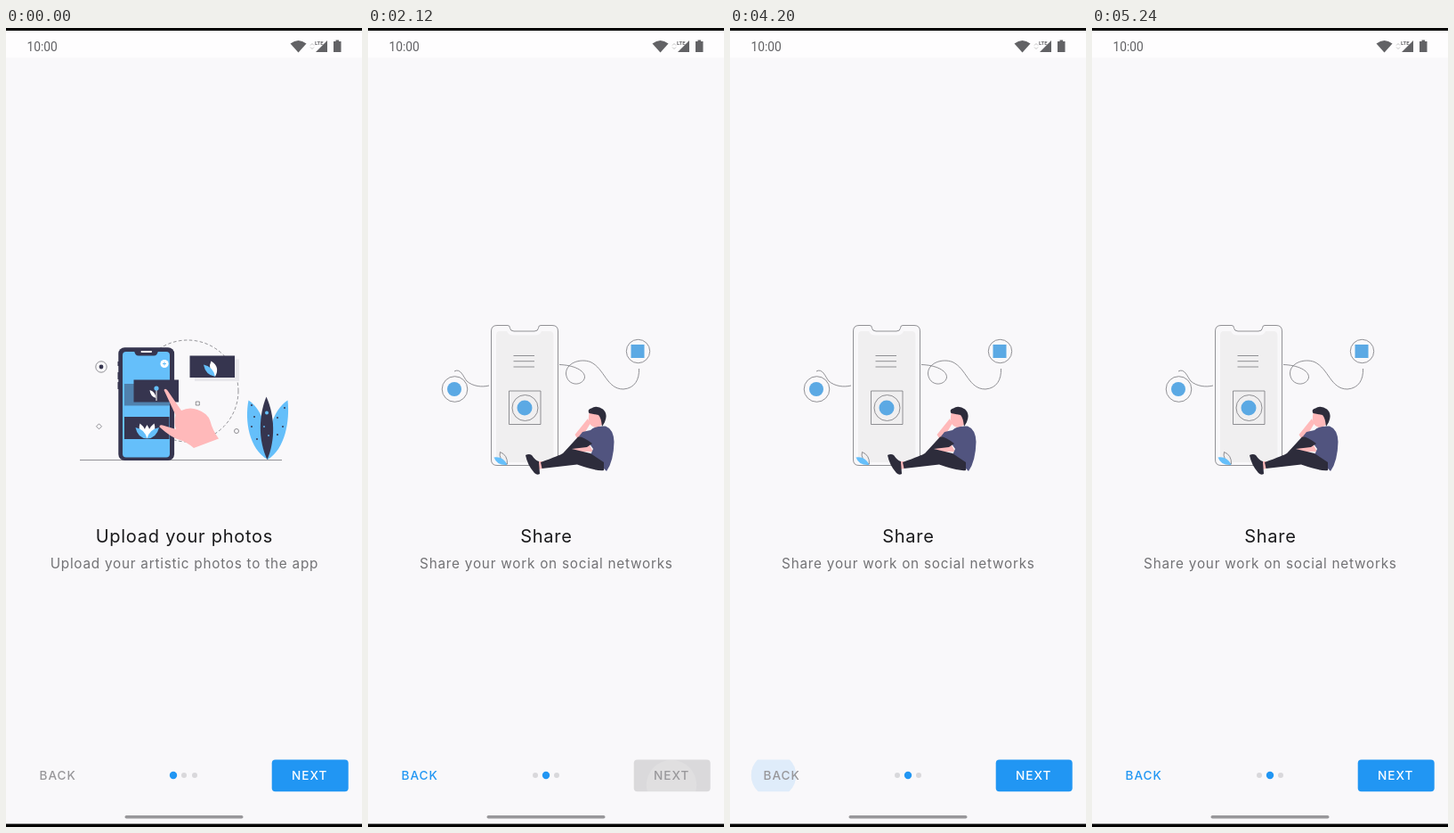
Write an HTML page that moves like this. It is 400x896 px and loops after 5280 ms.

```html
<!DOCTYPE html>
<html lang="en">
<head>
<meta charset="utf-8">
<title>Onboarding</title>
<style>
  html, body { margin: 0; width: 100%; height: 100%; overflow: hidden; background: #f9f8fa; }
  svg { display: block; width: 100vw; height: 100vh; }
  text { font-family: Inter, sans-serif; }
  .title { font-size: 20px; letter-spacing: .75px; fill: #1a1a1c; text-anchor: middle; }
  .sub { font-size: 15.3px; letter-spacing: .76px; fill: #727275; text-anchor: middle; }
  .label { font-size: 13.6px; font-weight: 500; letter-spacing: 1px; }
  .ink { fill: #36354f; }
  .blue { fill: #65bffa; }
  .white { fill: #fff; }
  .skin { fill: #ffb9ba; }
  .mark { fill: #5ba9e4; }
  .line { fill: none; stroke: #77777b; stroke-width: .8; }
</style>
</head>
<body>
<svg viewBox="0 0 400 896">
  <defs>
    <clipPath id="backClip"><rect x="16" y="820.500" width="85" height="35.800" rx="4"/></clipPath>
    <clipPath id="nextClip"><rect x="298.700" y="820.500" width="86" height="35.800" rx="4"/></clipPath>
  </defs>
  <rect width="400" height="896" fill="#f9f8fa"/>
  <rect y="3" width="400" height="30.500" fill="#fefdfe"/>
  <path d="M0 0H400V3H0zM0 892.500H400V896H0z"/>

  <g fill="#626265">
    <text x="23.500" y="25.500" style="font:13.800px Roboto,sans-serif">10:00</text>
    <path d="M319.500 17.500Q328.500 10.500 337.500 17.500L328.500 27.500z"/>
    <path d="M361 14V27H348z"/>
    <text x="347" y="18.500" style="font:bold 5.800px Roboto,sans-serif">LTE</text>
    <path d="M342 19.500l2-2 2 2M342 21.500l2 2 2-2" fill="none" stroke="#aaa" stroke-width=".7"/>
    <path d="M370.500 13.500h3.500v1.500h2.500v12h-8.500v-12h2.500z"/>
  </g>
  <rect x="133.500" y="883" width="133" height="3.600" rx="1.800" fill="#98979a"/>

  <g class="page">
    <circle class="line" cx="204" cy="407" r="57" stroke-dasharray="3.500 2.500"/>
    <path class="line" d="M83 484.500H310"/>
    <rect class="ink" x="126.300" y="358.300" width="62.800" height="126.700" rx="7"/>
    <path class="ink" d="M125.500 374h2v5h-2zM125.500 386h2v8h-2zM125.500 397h2v8h-2z"/>
    <rect class="blue" x="131" y="363" width="53" height="118.500" rx="4"/>
    <path class="ink" d="M144 362H171Q170 367.500 166 367.500H149Q145 367.500 144 362z"/>
    <rect class="white" x="151.500" y="362" width="12.500" height="2" rx="1"/>
    <circle class="white" cx="178" cy="376.500" r="4.600"/>
    <path d="M176 376.500h4M178 374.500v4" stroke="#65bffa"/>
    <rect x="133" y="399" width="51" height="24.500" fill="#36354f" opacity=".45"/>
    <rect class="ink" x="143.500" y="394.500" width="50.500" height="25"/>
    <path d="M169 405V418" stroke="#fff"/>
    <path class="white" d="M168.500 415Q162 413 161.500 406Q168 408 168.500 415z"/>
    <circle class="blue" cx="169" cy="404" r="2.600"/>
    <rect class="ink" x="133" y="436" width="50.500" height="25"/>
    <path class="white" d="M158.500 460Q147 454 150.500 443.500Q158 449 158.500 460Q159 449 166.500 443.500Q170 454 158.500 460z"/>
    <path class="white" d="M158.500 460Q153 452 158.500 445Q164 452 158.500 460z"/>
    <path class="blue" d="M158.500 460.500Q148 460 145.500 448Q156 450 158.500 460.500Q161 450 172 448Q169 460 158.500 460.500z"/>
    <rect x="212" y="371.500" width="50" height="24.500" fill="#e9e8ec"/>
    <rect class="ink" x="206.500" y="367.500" width="50.500" height="24.500"/>
    <path class="white" d="M235 391Q226 382 230.500 373.500Q241 380 235 391z"/>
    <path class="blue" d="M235 391Q224 389 222 377.500Q233 380 235 391z"/>
    <path class="skin" d="M177.500 406Q179 403.500 181.500 406.500L197 429Q206 424.500 215 428Q227 432 229.500 441Q232 451 239 460.500L211 471Q203 464 194 461.500Q186 459.500 172.500 447.500Q172 444.500 176 445.500L191 450Q188 442 190.500 434Q184 420 177.500 406z"/>
    <circle class="line" cx="107" cy="380" r="6.200"/>
    <circle class="ink" cx="107" cy="380" r="2.400"/>
    <path class="line" d="M104.500 443.800l3 3-3 3-3-3zM213.300 419h4v4h-4z"/>
    <circle class="line" cx="259" cy="452" r="2.500"/>
    <path class="blue" d="M294 484C273 472 268 440 272.500 417.500C290 429 295 455 294 484C293 455 299 429 316.500 417.500C319 440 314 472 294 484z"/>
    <path class="ink" d="M293.500 484C283 462 284 434 292.500 413.500C302 434 303 462 293.500 484z"/>
    <g class="ink">
      <circle cx="276" cy="423" r="1"/><circle cx="279" cy="436" r="1"/><circle cx="276" cy="447" r="1"/>
      <circle cx="282" cy="461" r="1"/><circle cx="313" cy="426" r="1"/><circle cx="305" cy="437" r="1"/>
      <circle cx="311" cy="447" r="1"/><circle cx="305" cy="456" r="1"/>
    </g>
    <g class="blue">
      <circle cx="293" cy="431.500" r="2"/><circle cx="290" cy="447" r=".9"/><circle cx="295" cy="457" r=".9"/>
    </g>
    <text class="title" x="200.400" y="577">Upload your photos</text>
    <text class="sub" x="200.400" y="605.500">Upload your artistic photos to the app</text>
  </g>

  <g class="page">
    <path class="line" d="M145 333.500H157Q159.500 333.500 159.500 336.500Q160 340 164 340H187Q191 340 191.500 336.500Q191.500 333.500 194 333.500H207Q213.500 333.500 213.500 340V484Q213.500 490.500 207 490.500H145Q138.500 490.500 138.500 484V340Q138.500 333.500 145 333.500z"/>
    <path fill="#f0eff0" d="M148 340H156Q158 344.500 163 344.500H188Q193 344.500 195 340H204Q208.500 340 208.500 345V482Q208.500 487 204 487H148Q144 487 144 482V345Q144 340 148 340z"/>
    <path class="line" d="M163.500 367.500h23.500m-23.500 6.200h23.500m-23.500 6.300h23.500M158.500 407h35.500v37.500h-35.500z"/>
    <circle class="line" cx="176.500" cy="426" r="14.500"/>
    <circle class="mark" cx="176" cy="426" r="8.500"/>
    <circle class="line" cx="97.500" cy="405" r="14.300"/>
    <circle class="mark" cx="97" cy="405" r="8"/>
    <circle class="line" cx="303.500" cy="362.500" r="13.200"/>
    <rect class="mark" x="295.500" y="355" width="15" height="15"/>
    <path class="line" d="M97 385C104 381 107 391 111 396C118 402 128 403 136 401M215 377.500C231 378 244 384 243.500 392C241 402 224 402 222.500 388C222 376 238 370 250 374.500C266 382 268 405 287 405C300 404 305 394 304.500 382"/>
    <path class="line" d="M156.500 489Q146 483 148.500 475.500Q157 479 156.500 489z"/>
    <path class="blue" d="M156.500 490Q145 491 141.500 481.500Q152 480 156.500 490z"/>
    <path class="skin" d="M249 430Q246 441 251 446L257 449 264 444V431zM247 438L232.500 456 235 460 241 458 249.500 444zM229 471L249 468 253 475 233 475zM190 486L196 486 196 494 191 495z"/>
    <path fill="#51547f" d="M250 451Q254 446 267 446.500Q276 450 276.500 464Q276 486 268 497L260 489Q250 487 249 481L253 472 248 465 237 458 241 453z"/>
    <path fill="#2d2c3b" d="M236 458.500Q240 457 252 466L246 470 229 472 250 477 265 487V496Q258 497.500 235 489.500L195.500 494 194 487Q216 479 219 477zM177 479Q181 477 184 479Q188 485 192 486L193 500Q190 502 187 499Q179 490 177 479z"/>
    <path fill="#2d2c3b" d="M248.500 432Q246 428 251 426.500Q257 422.500 264 427.500Q270 433 266 442L263 447Q262 437 259 434Q254 433 248.500 432z"/>
    <text class="title" x="200.400" y="577">Share</text>
    <text class="sub" x="200.400" y="605.500">Share your work on social networks</text>
  </g>

  <g class="page"></g>

  <g clip-path="url(#backClip)"><circle id="backRipple" fill="#2196f3"/></g>
  <text id="back" class="label" x="37.500" y="843">BACK</text>
  <rect id="nextBox" x="298.700" y="820.500" width="86" height="35.800" rx="4"/>
  <g clip-path="url(#nextClip)"><circle id="nextRipple" fill="#fff"/></g>
  <text id="next" class="label" x="321" y="843">NEXT</text>
  <circle class="dot" cx="188" cy="838"/>
  <circle class="dot" cx="200" cy="838"/>
  <circle class="dot" cx="212" cy="838"/>
</svg>
<script>
const LOOP = 5280, SLIDE = 30, DURATION = 300;
const BLUE = [33, 150, 243], GREY = [217, 216, 219];
const taps = [
  { at: 1400, from: 0, to: 1, x: 319, y: 830, r: 30 },
  { at: 2120, from: 1, to: 2, x: 341, y: 849, r: 28 },
  { at: 3440, from: 2, to: 1, x: 55, y: 822, r: 28 },
  { at: 4200, from: 1, to: 0, x: 49, y: 838, r: 25 },
  { at: 4880, from: 0, to: 1, x: 340, y: 838, r: 28 }
];
const idle = { at: -1e4, from: 1, to: 0, x: 0, y: 0, r: 0 };

const byId = id => document.getElementById(id);
const pages = [...document.querySelectorAll('.page')];
const dots = [...document.querySelectorAll('.dot')];
const clamp = v => Math.min(1, Math.max(0, v));
const mix = (a, b, k) => a + (b - a) * k;

function set(el, attrs) {
  for (const name in attrs) el.setAttribute(name, attrs[name]);
}

// Cubic bezier (x1, 0, x2, 1), solved by bisection.
const bezier = (x1, x2) => value => {
  const x = clamp(value);
  let lo = 0, hi = 1;
  for (let i = 0; i < 24; i++) {
    const s = (lo + hi) / 2, q = 1 - s;
    if (3 * q * q * s * x1 + 3 * q * s * s * x2 + s ** 3 < x) lo = s; else hi = s;
  }
  return lo * lo * (3 - 2 * lo);
};
const standard = bezier(.4, .2), accelerate = bezier(.4, 1), decelerate = bezier(0, .2);

function draw(time) {
  const tap = taps.filter(e => e.at <= time).pop() || idle;
  const age = time - tap.at, p = clamp(age / DURATION);
  const dir = Math.sign(tap.to - tap.from), moved = standard(p);

  pages.forEach((page, i) => {
    const entering = i === tap.to;
    const opacity = entering ? decelerate((p - .3) / .7)
      : i === tap.from ? 1 - accelerate(p / .3) : 0;
    const shift = dir * SLIDE * (entering ? 1 - moved : -moved);
    set(page, { opacity, transform: `translate(${shift})` });
  });

  dots.forEach((dot, i) => {
    const on = i === tap.to ? p : i === tap.from ? 1 - p : 0;
    const fill = `rgb(${GREY.map((c, k) => Math.round(mix(c, BLUE[k], on)))})`;
    set(dot, { r: mix(3, 4.2, on), fill });
  });

  const canBack = tap.to > 0, canNext = tap.to < 2;
  set(byId('back'), { fill: canBack ? '#2196f3' : '#979699' });
  set(byId('nextBox'), { fill: canNext ? '#2196f3' : '#dad9db' });
  set(byId('next'), { fill: canNext ? '#fff' : '#99989b' });

  const ripple = (id, active, strength) => set(byId(id), {
    cx: tap.x, cy: tap.y,
    r: mix(tap.r, 80, clamp(age / 225)),
    opacity: active ? strength * clamp(1 - age / 340) : 0
  });
  ripple('backRipple', dir < 0, .12);
  ripple('nextRipple', dir > 0, canNext ? .24 : .15);
}

const start = performance.now();
function tick() {
  draw((performance.now() - start) % LOOP);
  requestAnimationFrame(tick);
}
tick();
</script>
</body>
</html>
```
